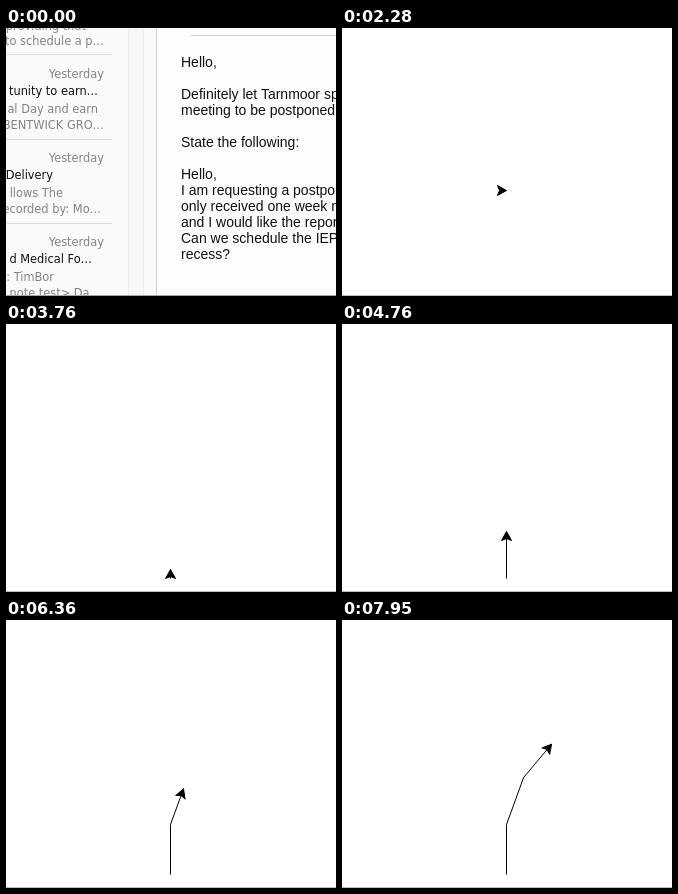
Recreate the animation shown at these times as an HTML page. Size 330 by 268 pixels, loop 8000 ms.

```html
<!DOCTYPE html>
<html lang="en">
<head>
<meta charset="utf-8">
<title>Turtle</title>
<style>
  html, body { margin: 0; width: 100%; height: 100%; overflow: hidden; background: #fff; }
  svg { display: block; width: 330px; height: 268px; }
  text { white-space: pre; }
  .list { font: 11.4px "DejaVu Sans", sans-serif; fill: #838383; }
  .list .subject { fill: #111; }
  .list .end { text-anchor: end; }
  .body { font: 14px "Liberation Sans", Arial, sans-serif; fill: #111; }
</style>
</head>
<body>
<svg viewBox="0 0 330 268">
  <g id="mail">
    <rect width="330" height="268" fill="#fafafa"/>
    <rect x="122" width="16" height="268" fill="#f6f6f6"/>
    <path d="M122.5 0V268M137.5 0V268" stroke="#ebebeb"/>
    <rect x="151" width="179" height="268" fill="#fdfdfd"/>
    <path d="M150.5 0V268" stroke="#cfcfcf"/>
    <path d="M184 7.5H330" stroke="#d4d4d4"/>
    <path d="M0 26.5H106M0 111.5H106M0 195.5H106" stroke="#dcdcdc"/>
    <g class="list" id="list"></g>
    <g class="body" id="body"></g>
  </g>
  <g id="stage">
    <rect id="paper" width="330" height="268"/>
    <polyline id="trail" fill="none" stroke="#000"/>
    <polygon id="turtle" points="0,0 -9,-5 -7,0 -9,5" stroke="#000" stroke-linejoin="round"/>
  </g>
  <path id="edge" d="M0 267.5H330"/>
</svg>
<script>
const LOOP = 8000, OPEN = 1200, READY = 1980, PEN_DOWN = 3523;
const $ = id => document.getElementById(id);

function addText(parent, x, y, content, cls = '') {
  const node = document.createElementNS('http://www.w3.org/2000/svg', 'text');
  node.setAttribute('x', x);
  node.setAttribute('y', y);
  node.setAttribute('class', cls);
  node.textContent = content;
  parent.append(node);
}

// Lines cut by the left edge are anchored at their visible right end.
const listLine = (x, y, content, cls = '') => addText($('list'), x, y, content, 'end ' + cls);
listLine(80, 2, 'providing that');
listLine(98, 17, 'to schedule a p…');
[50, 134, 218].forEach(y => listLine(98, y, 'Yesterday'));
listLine(92, 67, 'tunity to earn…', 'subject');
listLine(92, 85, 'al Day and earn');
listLine(98, 101, 'BENTWICK GRO…');
listLine(47, 151, 'Delivery', 'subject');
listLine(57, 169, 'llows The');
listLine(95, 185, 'recorded by: Mo…');
listLine(86, 235, 'd Medical Fo…', 'subject');
listLine(48, 253, 'n: TimBor');
listLine(95, 269, 'note.test> Da…');

['Hello,', '', 'Definitely let Tarnmoor speak', 'meeting to be postponed.', '',
 'State the following:', '', 'Hello,', 'I am requesting a postponement', 'only received one week notice',
 'and I would like the reports', 'Can we schedule the IEP after', 'recess?']
  .forEach((line, i) => addText($('body'), 175, 39 + 16 * i, line));

// time, x, y, heading in degrees (0 = right, 90 = up)
const poses = [
  [1980, 164.5, 116.5, 0],
  [2880, 164.5, 254.5, 0],
  [3510, 164.5, 254.5, 90],
  [PEN_DOWN, 164.5, 254.5, 90],
  [4839, 164.5, 204.5, 90],
  [5360, 164.5, 204.5, 70],
  [5460, 164.5, 204.5, 70],
  [6160, 174.1, 178.2, 70],
  [6260, 174.1, 178.2, 70],
  [6360, 177.5, 168.8, 70],
  [6676, 181.6, 157.5, 70],
  [6815, 181.6, 157.5, 50],
  [7950, 209.6, 124.2, 50]
];

function poseAt(t) {
  const next = poses.findIndex(p => p[0] > t);
  if (next === 0) return poses[0];
  if (next < 0) return poses[poses.length - 1];
  const a = poses[next - 1], b = poses[next];
  const k = (t - a[0]) / (b[0] - a[0]);
  return a.map((v, i) => v + (b[i] - v) * k);
}

// The picture advances ten times a second, with small phase shifts.
function stepTime(t) {
  const [start, phase] = t < 3760 ? [OPEN, 80] : t < 6390 ? [3760, 60] : [6360, 50];
  return Math.max(start, Math.floor((t - phase) / 100) * 100 + phase);
}

function render(t) {
  const open = t >= OPEN;
  $('mail').style.display = open ? 'none' : '';
  $('stage').style.display = open ? '' : 'none';
  $('edge').setAttribute('stroke', t < READY ? '#a4a4a4' : '#bcbcbc');
  if (!open) return;

  const now = stepTime(t);
  const shade = Math.round(244 + 11 * Math.min(1, (now - OPEN) / (READY - OPEN)));
  $('paper').setAttribute('fill', `rgb(${shade},${shade},${shade})`);

  const [, x, y, heading] = poseAt(now);
  $('turtle').style.display = now > OPEN ? '' : 'none';
  $('turtle').setAttribute('transform', `translate(${x} ${y}) rotate(${-heading})`);

  const passed = poses.filter(p => p[0] >= PEN_DOWN && p[0] <= now).map(p => [p[1], p[2]]);
  $('trail').setAttribute('points', passed.length ? [...passed, [x, y]].join(' ') : '');
}

const began = performance.now();
function frame() {
  render((performance.now() - began) % LOOP);
  requestAnimationFrame(frame);
}
frame();
</script>
</body>
</html>
```
